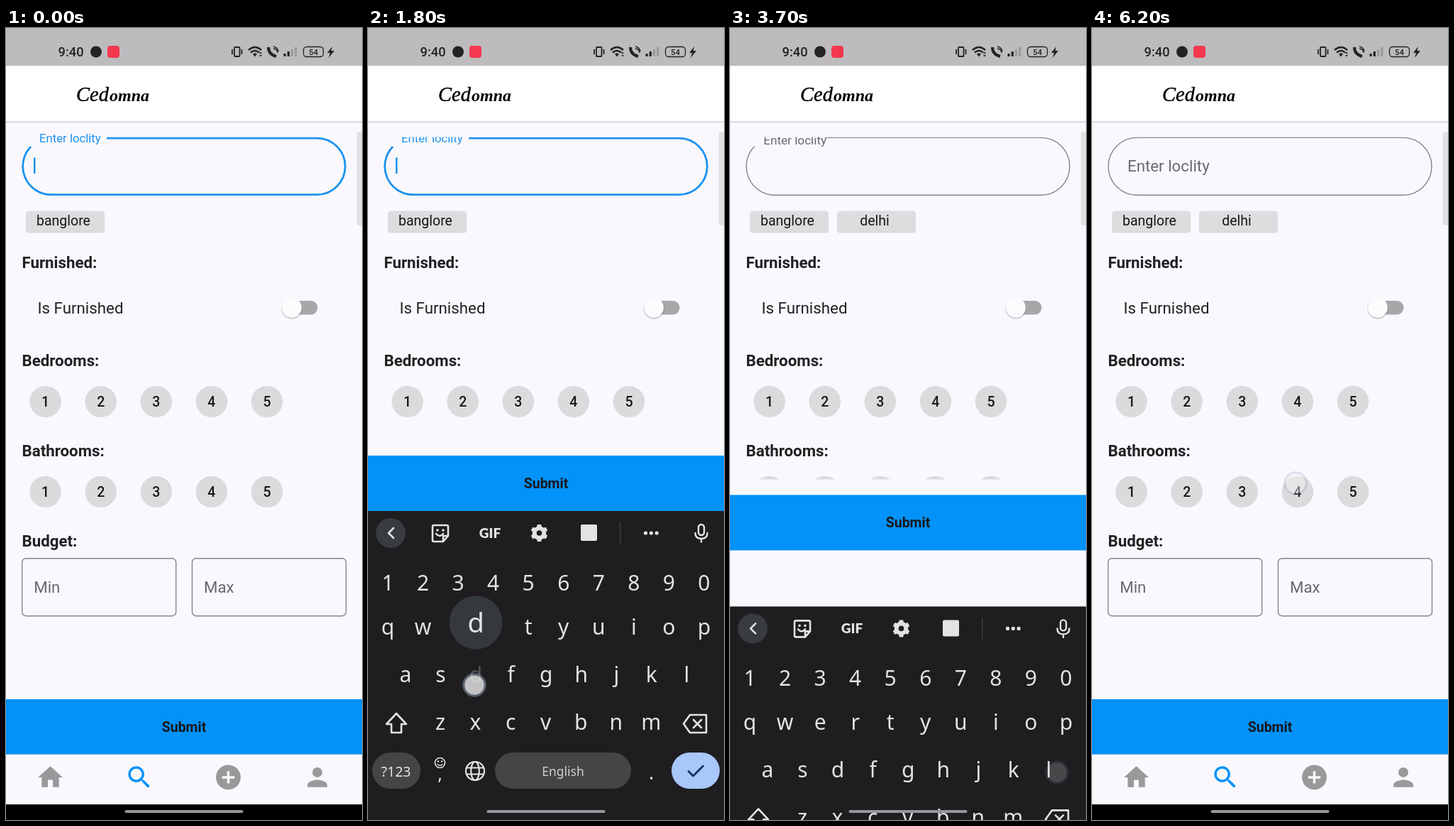
Animation of 502x1115 px, one loop 6300 ms. Source, as an HTML page:

```html
<!DOCTYPE html>
<html lang="en">
<head>
<meta charset="utf-8">
<title>Room search form</title>
<style>
  html, body { margin: 0; width: 100%; height: 100%; overflow: hidden; background: #faf8fc; }
  svg { display: block; width: 502px; height: 1115px; font-family: Roboto, sans-serif; }
  .mid { text-anchor: middle; }
  .body { font-size: 22.3px; fill: #212023; }
  .head { font-size: 22.3px; font-weight: 700; fill: #212023; }
  .small { font-size: 19.5px; fill: #18171a; }
  .hint { font-size: 22.3px; fill: #6a686d; }
  .outline { fill: none; stroke: #868488; stroke-width: 1.4; }
  .line { fill: none; stroke: #e3e3e5; stroke-width: 2.6; stroke-linejoin: round; stroke-linecap: round; }
  .key { font: 30px "Noto Sans", sans-serif; fill: #e3e3e5; text-anchor: middle; }
  .word { font: 23px "Noto Sans", sans-serif; fill: #dedee0; text-anchor: middle; }
</style>
</head>
<body>
<svg id="stage" viewBox="0 0 502 1115"></svg>
<script>
const LOOP = 6300, STEP = 100;
const KEYBOARD_HEIGHT = 435, BODY_BOTTOM = 1023, BODY_LIFT = 343, BODY_LAG = 32;
const INK = '#232225', LIGHT = '#e3e3e5';

const text = (x, y, str, cls, extra = '') => `<text x="${x}" y="${y}" class="${cls}" ${extra}>${str}</text>`;
const rect = (x, y, w, h, r, fill, extra = '') =>
  `<rect x="${x}" y="${y}" width="${w}" height="${h}" rx="${r}" fill="${fill}" ${extra}/>`;
const circle = (x, y, r, fill, extra = '') => `<circle cx="${x}" cy="${y}" r="${r}" fill="${fill}" ${extra}/>`;
const path = (d, extra) => `<path d="${d}" ${extra}/>`;
const line = (d, extra = '') => path(d, `class="line" ${extra}`);
const range = (n, fn) => Array.from({ length: n }, (_, i) => fn(i)).join('');

// Keyboard letters with their centres
const keys = {};
[['1234567890', 28, 792], ['qwertyuiop', 28, 854], ['asdfghjkl', 53, 921], ['zxcvbnm', 102, 988]]
  .forEach(([row, x, y]) => [...row].forEach((c, i) => keys[c] = { x: x + 49.55 * i, y }));

const taps = [
  { key: 'd', x: 150, y: 925, down: 1800, up: 1900 },
  { key: 'e', x: 118, y: 869, down: 2000, up: 2100 },
  { key: 'l', x: 444, y: 925, down: 2200, up: 2300 },
  { key: 'h', x: 302, y: 936, down: 2500, up: 2600 },
  { key: 'i', x: 372, y: 869, down: 2600, up: 2700 },
  { x: 461, y: 1048, down: 3500, up: 3600 },
  { x: 266, y: 630, down: 4700, up: 4800 },
  { x: 287, y: 641, down: 6100, up: 6200 }
];
const suggestions = [
  [], ['d', 'do', 'did'], ['de', 'dekh', 'dear'], ['del', 'Delhi', 'delete'],
  ['delh', 'delhi', 'Delhi'], ['delhi', 'Delhi', 'dekhi']
];

const statusBar = () => `
  ${rect(0, 0, 502, 53.5, 0, '#bdbbbe')}
  ${text(73.5, 40, '9:40', '', `font-size="18.3" font-weight="500" fill="${INK}"`)}
  ${circle(127, 33.5, 8, INK)}
  ${rect(143, 25, 17, 17, 4, '#f5384f')}
  <g fill="none" stroke="${INK}" stroke-width="1.8">
    ${rect(322, 27, 7.5, 13, 1, 'none')}
    <path d="M319 30v7M332.5 30v7"/>
    <path d="M342 31q9-8 18 0M345 34.5q6-5 12 0" stroke-width="2.4"/>
    <path d="M377 29a6 6 0 0 1 6 6M377 26a9 9 0 0 1 7 7" stroke-width="1.5"/>
    <path d="M370 27q0 10 11 13" stroke-width="4"/>
    ${rect(419.5, 26.5, 28, 14, 4.5, 'none', 'stroke-width="1.3"')}
  </g>
  ${path('M348 36.5q3-2 6 0l-3 4z', `fill="${INK}"`)}
  ${path('M357 36l2-2.5 2 2.5zM357 38l2 2.5 2-2.5z', `fill="${INK}"`)}
  ${range(4, i => rect(391.5 + 5.2 * i, 36 - 3 * i, 3.2, 4 + 3 * i, .8, i < 2 ? INK : '#9b999c'))}
  ${text(433.5, 38, '54', 'mid', `font-size="11.5" font-weight="500" fill="${INK}"`)}
  ${path('M460 26l-7 9h4l-2 7 8-10h-4.5z', `fill="${INK}"`)}`;

const appBar = () => `
  ${rect(0, 131, 502, 2.5, 0, '#dfdde1')}
  ${rect(0, 53.5, 502, 77.5, 0, '#fff')}
  ${text(99, 103, 'Ced', '', 'font-family="Liberation Serif, serif" font-size="28.5" font-style="italic" stroke="#000" stroke-width=".4"')}
  ${text(146, 103, 'omna', '', 'font-family="Liberation Serif, serif" font-size="24" font-style="italic" font-weight="700"')}`;

const chip = (x, label, id) => `<g id="${id}">
  ${rect(x, 258.5, 111, 30, 4, '#000', 'opacity=".13"')}
  ${rect(x + .5, 257.5, 110, 29, 4, '#dddcde')}
  ${text(x + 53, 278, label, 'small mid')}</g>`;

const numberRow = y => range(5, i => circle(55.6 + 78.1 * i, y, 22.3, '#dcdadd') +
  text(55.6 + 78.1 * i, y + 7, i + 1, 'small mid', 'font-weight="500"'));

const budgetBox = (x, label) => rect(x, 746.7, 217, 81, 5.5, 'none', 'class="outline"') +
  text(x + 16.5, 794.5, label, 'hint');

const form = () => `
  <g clip-path="url(#viewport)">
    <path id="border" class="outline"/>
    ${text(0, 0, 'Enter loclity', '', 'id="label"')}
    ${text(39, 201, '', 'body', 'id="typed" text-decoration="underline"')}
    ${rect(39, 182.5, 2.5, 22.5, 0, '#1e92ee', 'id="cursor"')}
    ${chip(28, 'banglore', 'chipA')}${chip(151, 'delhi', 'chipB')}
    ${text(22.5, 338, 'Furnished:', 'head')}
    ${text(44.5, 401.5, 'Is Furnished', 'body')}
    ${rect(395, 384, 44.5, 19.5, 9.7, '#a9a6aa')}
    ${circle(403, 395, 14.7, '#000', 'opacity=".16"')}${circle(403, 393.7, 13.9, '#fdfbfe')}
    ${text(22.5, 476, 'Bedrooms:', 'head')}${numberRow(526)}
    ${text(22.5, 603, 'Bathrooms:', 'head')}${numberRow(653)}
    ${text(22.5, 729.5, 'Budget:', 'head')}
    ${budgetBox(22.7, 'Min')}${budgetBox(262.5, 'Max')}
  </g>
  <g id="submit">
    ${rect(0, -78, 502, 78, 0, '#0392f8')}
    ${text(251, -32, 'Submit', 'small mid', 'font-weight="700"')}
  </g>
  ${rect(494.5, 146, 12, 132, 4, '#e2e0e3')}`;

const navIcon = (x, d, fill = '#9a989b') =>
  path(d, `fill="${fill}" fill-rule="evenodd" transform="translate(${x - 20.9} 1034) scale(1.742)"`);

const navBar = () => `
  ${rect(0, 1023, 502, 70, 0, '#faf8fc')}${rect(0, 1022.5, 502, 1, 0, '#e3e1e5')}
  ${navIcon(62.5, 'M10 20v-6h4v6h5v-8h3L12 3 2 12h3v8z')}
  ${navIcon(188, 'M15.5 14h-.8l-.27-.27A6.5 6.5 0 1 0 13.73 14.43l.27.27v.8l5 5L20.5 19zM9.5 14a4.5 4.5 0 1 1 0-9 4.5 4.5 0 0 1 0 9z', '#0a92fa')}
  ${navIcon(313.5, 'M12 2a10 10 0 1 0 0 20 10 10 0 0 0 0-20zm5 11h-4v4h-2v-4H7v-2h4V7h2v4h4z')}
  ${navIcon(439, 'M12 12a4 4 0 1 0 0-8 4 4 0 0 0 0 8zm0 2c-2.67 0-8 1.34-8 4v2h16v-2c0-2.66-5.33-4-8-4z')}
  ${rect(0, 1093, 502, 22, 0, '#000')}`;

const toolbar = () => `<g id="tools">
  ${line('M36 704l-7 7 7 7')}
  ${line('M93 700h18q2 0 2 2v13l-7 8H93q-2 0-2-2v-19q0-2 2-2zM113 715h-7v8M96 712q5 6 10 0')}
  ${circle(98, 707, 1.8, LIGHT)}${circle(106, 707, 1.8, LIGHT)}
  ${text(172, 717.5, 'GIF', 'mid', `font-family="Lato, sans-serif" font-size="19" font-weight="900" fill="${LIGHT}"`)}
  ${circle(241.5, 711, 6.8, 'none', `stroke="${LIGHT}" stroke-width="6"`)}
  ${range(6, i => rect(238.5, 699, 6, 5, 1, LIGHT, `transform="rotate(${60 * i} 241.5 711)"`))}
  ${rect(300, 699, 23, 23, 2, LIGHT)}
  ${rect(355, 696, 1.2, 30, 0, '#444448')}
  ${range(3, i => circle(391.5 + 7.8 * i, 711, 2.6, LIGHT))}
</g>
<g id="words">
  ${line('M29 704l7 7-7 7')}
  ${[182, 318].map(x => rect(x - .6, 695, 1.2, 33, 0, '#444448')).join('')}
  ${[120.5, 249, 378].map(x => text(x, 720.5, '', 'word')).join('')}
</g>`;

const keyboard = () => `<g id="keyboard">
  ${rect(0, 680, 502, 435, 0, '#1f1d20')}
  ${circle(32, 711, 21, '#383b40')}
  ${toolbar()}
  ${rect(466, 699, 8, 15, 4, 'none', 'class="line" style="stroke-width:2.4"')}
  ${line('M461.5 711q0 8 8.5 8t8.5-8M470 719v4.5', 'style="stroke-width:2.4"')}
  ${Object.entries(keys).map(([c, k]) => text(k.x, k.y, c, 'key', `id="key-${c}"`)).join('')}
  ${line('M40 965l14 15h-7v12H33v-12h-7z')}
  ${line('M454 967h23v25h-23l-9-12.5zM459 974l11 11M470 974l-11 11')}
  ${rect(6, 1020, 68, 51, 25.5, '#444547')}
  ${text(39.5, 1053.5, '?123', 'mid', `font-family="Noto Sans, sans-serif" font-size="19.5" font-weight="500" fill="${LIGHT}"`)}
  ${circle(101.5, 1034.5, 7, 'none', `stroke="${LIGHT}" stroke-width="1.6"`)}
  ${circle(99, 1032.5, 1.2, LIGHT)}${circle(104, 1032.5, 1.2, LIGHT)}
  ${line('M98 1036.5q3.5 3.5 7 0', 'style="stroke-width:1.5"')}
  ${text(101.5, 1059, ',', 'key', 'style="font-size:25px"')}
  <g class="line" style="stroke-width:2.2">
    ${circle(151, 1046, 13, 'none')}<ellipse cx="151" cy="1046" rx="5.8" ry="13"/>
    <path d="M139 1041.5h24M139 1050.5h24"/>
  </g>
  ${rect(179, 1020, 192, 51, 25.5, '#444547')}
  ${text(275, 1052.5, 'English', 'mid', 'font-family="Noto Sans, sans-serif" font-size="17.5" fill="#cfcfd1"')}
  ${text(399.5, 1058, '.', 'key', 'style="font-size:27px"')}
  ${rect(428, 1020, 68, 51, 25.5, '#a8c7fa')}
  ${line('M452 1046.5l6.5 6.5 14-14', 'style="stroke:#123064;stroke-width:2.8"')}
  <g id="popup">${circle(0, 0, 37.5, '#35383d')}${text(0, 14, '', 'key', 'style="font-size:38px"')}</g>
</g>`;

const touchDot = () => `<g class="touch">
  ${circle(0, 0, 15.2, 'none', 'stroke="#8fa3bd" stroke-width="3" opacity=".5"')}
  ${circle(0, 0, 13.8, '#f2f2f4', 'opacity=".78"')}</g>`;

const stage = document.getElementById('stage');
stage.innerHTML = `
  <clipPath id="viewport"><rect id="window" width="502"/></clipPath>
  ${rect(0, 0, 502, 1115, 0, '#faf8fc')}
  ${form()}${statusBar()}${appBar()}${navBar()}${keyboard()}
  ${rect(167.5, 1101, 167, 4, 2, '#98969a')}
  ${taps.map(touchDot).join('')}`;

const $ = id => document.getElementById(id);
const touches = [...stage.querySelectorAll('.touch')];
const words = [...stage.querySelectorAll('.word')];
const clamp = x => Math.min(1, Math.max(0, x));
const easeOut = (x, power) => 1 - (1 - clamp(x)) ** power;
const easeIn = (x, power) => clamp(x) ** power;
const set = (el, attrs) => { for (const name in attrs) el.setAttribute(name, attrs[name]); };
const show = (el, visible) => set(el, { visibility: visible ? 'visible' : 'hidden' });

// The outer edge is fixed; a thicker stroke grows inwards
function borderPath(width, floating) {
  const top = 153.7 + width / 2, bottom = 236 - width / 2, r = (bottom - top) / 2;
  const left = 22.3 + width / 2 + r, right = 479.7 - width / 2 - r;
  const open = floating > 0;
  const start = open ? 35 + 107 * floating : left;
  const end = open ? `${left - r * .715} ${top + r * .301}` : `${left} ${top}Z`;
  return `M${start} ${top}H${right}A${r} ${r} 0 0 1 ${right} ${bottom}H${left}A${r} ${r} 0 0 1 ${end}`;
}

function drawField(t) {
  const focused = t < 3700;
  const floating = 1 - easeOut((t - 3695) / 190, 3);
  const typed = focused ? 'delhi'.slice(0, taps.filter(tap => tap.key && t >= tap.up).length) : '';
  const width = focused ? 2.8 : 1.4;
  set($('border'), {
    d: borderPath(width, floating),
    style: `stroke-width:${width};stroke:${focused ? '#1e92ee' : '#868488'}`
  });
  set($('label'), {
    x: 50 - 3 * floating, y: 202.3 - 41.8 * floating,
    'font-size': 22.3 * (1 - .25 * floating), fill: focused ? '#1e92ee' : '#6a686d'
  });
  $('typed').textContent = typed;
  set($('cursor'), { x: 39 + (typed ? $('typed').getComputedTextLength() + .5 : 0) });
  show($('cursor'), t < 300 || (t >= 800 && t < 1400) || (t >= 1800 && t < 3200));
  show($('chipB'), !focused);

  show($('tools'), !typed);
  show($('words'), typed);
  words.forEach((word, i) => word.textContent = suggestions[typed.length][i] || '');
}

const keyboardDrop = t => easeIn((t - 3604) / 200, 1.6);

function drawLayout(t) {
  const raised = easeOut((t - 1050) / 250, 4) - keyboardDrop(t);
  set($('keyboard'), { transform: `translate(0 ${KEYBOARD_HEIGHT * (1 - raised)})` });

  // The form jumps up once the keyboard is open, then follows it down slightly late
  const lifted = t < 1400 ? 0 : 1 - keyboardDrop(t - BODY_LAG);
  const bottom = BODY_BOTTOM - BODY_LIFT * lifted;
  set($('submit'), { transform: `translate(0 ${bottom})` });
  // The form is clipped only while its content overflows
  const viewEnd = bottom - 100;
  const top = viewEnd < 828 ? 153.5 : 0;
  set($('window'), { y: top, height: viewEnd - top });
}

function drawTaps(t) {
  taps.forEach((tap, i) => {
    const opacity = t < tap.down ? 0 : t < tap.up ? 1 : Math.max(0, .6 - .35 * (t - tap.up) / 100);
    set(touches[i], { transform: `translate(${tap.x} ${tap.y})`, opacity: t >= tap.up + 200 ? 0 : opacity });
    if (tap.key) set($('key-' + tap.key), { opacity: t >= tap.down && t < tap.up ? .25 : 1 });
  });
  const pressed = taps.find(tap => tap.key && t >= tap.down && t < tap.up);
  show($('popup'), pressed);
  if (pressed) {
    const { x, y } = keys[pressed.key];
    set($('popup'), { transform: `translate(${x} ${y - 84})` });
    $('popup').lastElementChild.textContent = pressed.key;
  }
}

function frame() {
  const t = Math.floor(performance.now() % LOOP / STEP) * STEP;
  drawField(t);
  drawLayout(t);
  drawTaps(t);
  requestAnimationFrame(frame);
}
frame();
</script>
</body>
</html>
```
